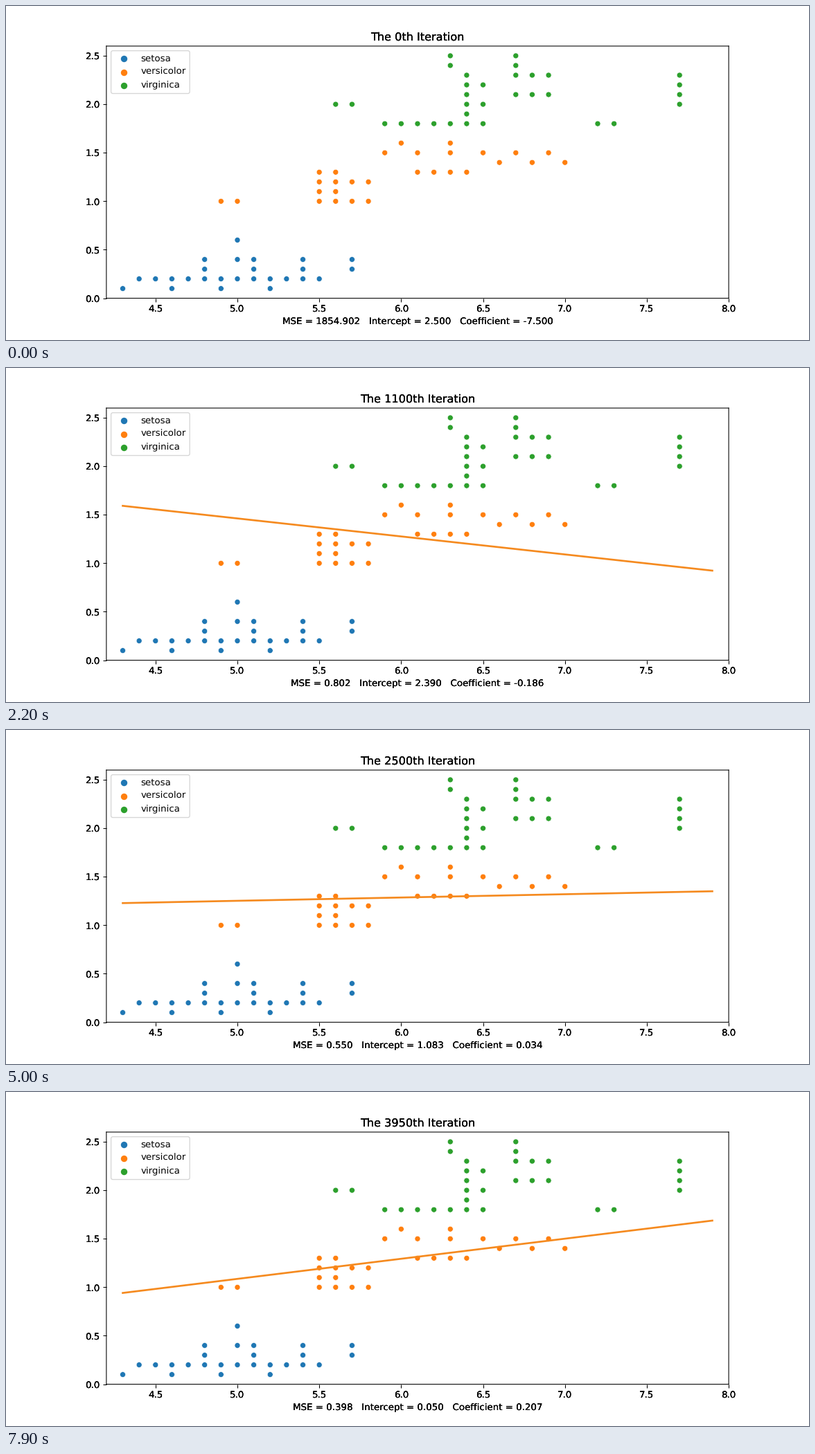
Animation of 1159 by 483 pixels, one loop 8000 ms. Source, as a matplotlib script:

```python
import matplotlib.pyplot as plt
import numpy as np
from matplotlib.animation import FuncAnimation

DPI = 96.6
W, H = 1159, 483
FRAMES, INTERVAL, STEPS = 80, 100, 50
LINE_COLOR = "#f58a1f"

plt.rcParams.update({"font.family": "DejaVu Sans", "text.hinting": "none"})

# each cloud is a few lattice blocks: sepal length by petal width, in tenths
grid = np.mgrid
SPECIES = {
    "setosa": ("tab:blue", [
        grid[44:56, 2:3], grid[43:53:3, 1:2],
        grid[48:58:3, 3:5], grid[50:51, 4:7:2],
    ]),
    "versicolor": ("tab:orange", [
        grid[49:51, 10:11], grid[55:59, 10:13:2], grid[55:57, 11:14:2],
        grid[61:65, 13:14], grid[66:71:2, 14:15], grid[59:70:2, 15:16],
        grid[60:64:3, 16:17],
    ]),
    "virginica": ("tab:green", [
        grid[59:66, 18:19], grid[72:74, 18:19], grid[56:58, 20:21],
        grid[64:66, 20:23:2], grid[64:65, 19:24:2], grid[67:70, 21:24:2],
        grid[63:68:4, 24:26], grid[77:78, 20:24],
    ]),
}

# moments of the full flower sample
MEAN_X, MEAN_Y = 876.5 / 150, 179.9 / 150
VAR_X, VAR_Y, COV = 0.681122, 0.577133, 0.512829


def descend(count, rate=0.01, b=2.5, k=-7.5):
    """Fit y = b + k x by gradient descent, returning (b, k) before each step."""
    path = []
    for _ in range(count):
        path.append((b, k))
        err = b + k * MEAN_X - MEAN_Y
        grad_k = err * MEAN_X + k * VAR_X - COV
        b, k = b - rate * err, k - rate * grad_k
    return path


def mse(b, k):
    return VAR_Y + k * k * VAR_X - 2 * k * COV + (b + k * MEAN_X - MEAN_Y) ** 2


fits = descend(FRAMES * STEPS)[::STEPS]

fig = plt.figure(figsize=((W + 0.01) / DPI, (H + 0.01) / DPI), dpi=DPI,
                 facecolor="white")

# stacked axes give the outer text its heavier weight
layers = [fig.add_axes([0.125, 0.125, 0.775, 0.755]) for _ in range(3)]
for layer in layers:
    layer.set(xlim=(4.2, 8.0), ylim=(0, 2.6))
*under, ax = layers
for layer in under:
    layer.spines[:].set_visible(False)
    layer.tick_params(color="none")
for spine in ax.spines.values():
    spine.set_snap(False)

clouds, colors = [], []
for name, (color, blocks) in SPECIES.items():
    cloud = np.hstack([block.reshape(2, -1) for block in blocks]) / 10
    clouds.append(cloud)
    colors += [color] * cloud.shape[1]
    ax.scatter([], [], color=color, label=name)
ax.scatter(*np.hstack(clouds), s=36, c=colors, edgecolors="white",
           linewidths=0.48)
ax.legend(loc="upper left").get_frame().set_snap(False)

x_ends = np.array([4.3, 7.9])
line, = ax.plot([], [], color=LINE_COLOR, lw=2)


def update(i):
    b, k = fits[i]
    line.set_data(x_ends, b + k * x_ends)
    for layer in layers:
        layer.set_title(f"The {i * STEPS}th Iteration")
        layer.set_xlabel(f"MSE = {mse(b, k):.3f}   Intercept = {b:.3f}   "
                         f"Coefficient = {k:.3f}")
    return [line]


anim = FuncAnimation(fig, update, frames=FRAMES, interval=INTERVAL,
                     repeat=True, repeat_delay=0, blit=False)
plt.show()
```
